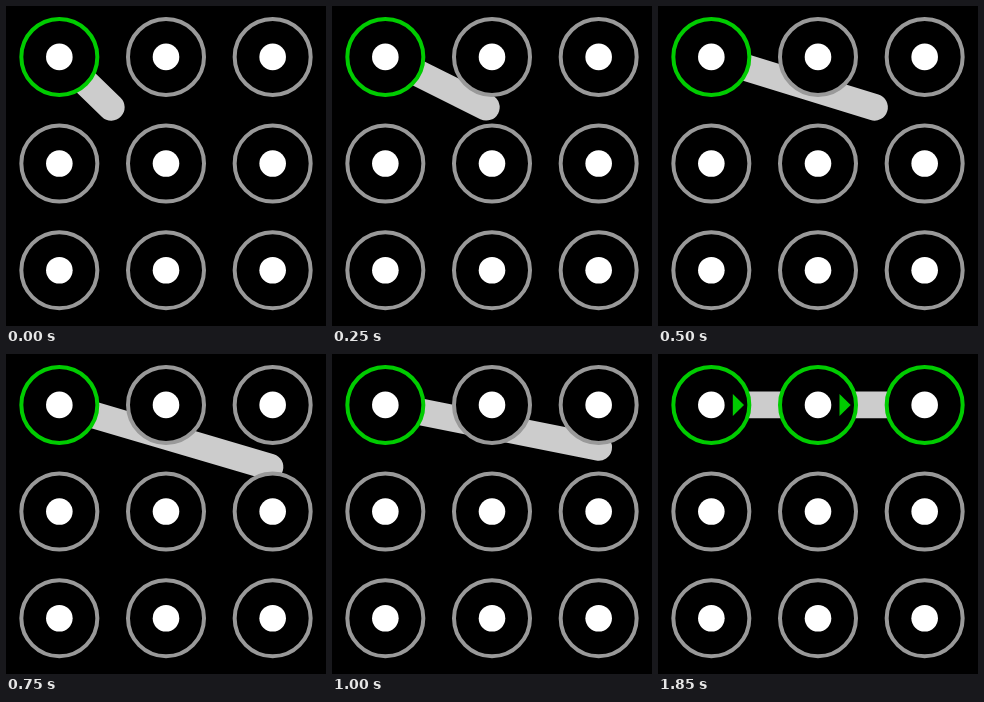
Animation, 320 px wide and 320 px high, one loop 2.25 s. Source, as an HTML page with a canvas:

```html
<!DOCTYPE html>
<html lang="en">
<head>
<meta charset="utf-8">
<title>Pattern lock</title>
<style>
  html, body { margin: 0; width: 100%; height: 100%; overflow: hidden; background: #000; }
  canvas { display: block; }
</style>
</head>
<body>
<canvas width="320" height="320"></canvas>
<script>
const ctx = document.querySelector('canvas').getContext('2d');
const GREEN = '#00cc00', GREY = '#999999', TRAIL = '#cccccc';
const SPACING = 320 / 3, LEFT = SPACING / 2, TOP = 50.9;
const STEP = 250, LOOP = 2250;

// Where the finger rests in each step; afterwards the top row is complete.
const finger = [[105.3, 101.3], [154.3, 101.2], [216.5, 101.3], [264, 113], [266.7, 93.3]];

function disc(x, y, radius, fill) {
  ctx.beginPath();
  ctx.arc(x, y, radius, 0, 2 * Math.PI);
  ctx.fillStyle = fill;
  ctx.fill();
}

function drawTrail(x, y) {
  ctx.beginPath();
  ctx.moveTo(LEFT, TOP);
  ctx.lineTo(x, y);
  ctx.lineCap = 'round';
  ctx.lineWidth = 26.7;
  ctx.strokeStyle = TRAIL;
  ctx.stroke();
}

function drawNode(x, y, active) {
  disc(x, y, 38, '#000');
  ctx.lineWidth = 4;
  ctx.strokeStyle = active ? GREEN : GREY;
  ctx.stroke();
  disc(x, y, 13.3, '#fff');
}

function drawArrow(x, y) {
  ctx.beginPath();
  ctx.moveTo(x + 21.5, y - 11);
  ctx.lineTo(x + 32.7, y);
  ctx.lineTo(x + 21.5, y + 11);
  ctx.fillStyle = GREEN;
  ctx.fill();
}

function draw(now) {
  const step = Math.floor((now % LOOP) / STEP);
  const done = step >= finger.length;
  ctx.fillStyle = '#000';
  ctx.fillRect(0, 0, 320, 320);
  drawTrail(...(done ? [LEFT + 2 * SPACING, TOP] : finger[step]));
  for (let row = 0; row < 3; row++) {
    for (let col = 0; col < 3; col++) {
      const x = LEFT + col * SPACING, y = TOP + row * SPACING;
      drawNode(x, y, row === 0 && (done || col === 0));
      if (done && row === 0 && col < 2) drawArrow(x, y);
    }
  }
}

function tick() {
  draw(performance.now());
  requestAnimationFrame(tick);
}
tick();
</script>
</body>
</html>
```
